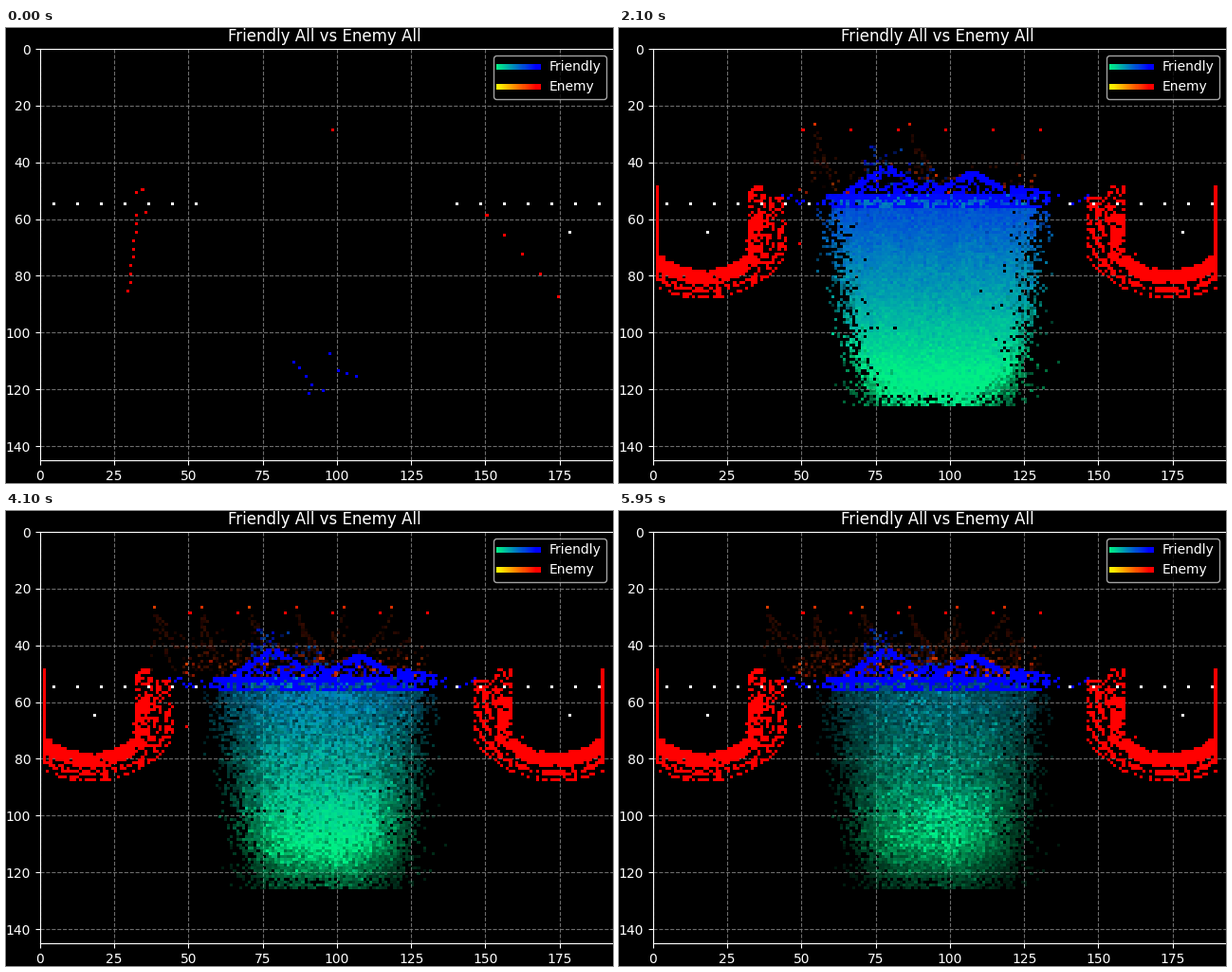
A matplotlib script that plays this animation: 640 by 480 pixels, repeating every 6000 ms.

```python
import numpy as np
import matplotlib.pyplot as plt
from matplotlib.animation import FuncAnimation
from matplotlib.legend_handler import HandlerTuple
from matplotlib.lines import Line2D

COLS, ROWS = 193, 145
FRAMES, STEP = 120, 50
LEFT, TOP, WIDE, HIGH = 36, 22, 604, 434
NEVER = 99.0

rng = np.random.default_rng(12)
R, C = np.mgrid[0:ROWS, 0:COLS]


def rand():
    return rng.random((ROWS, COLS))


def sigmoid(x):
    return 1 / (1 + np.exp(-x))


def bump(x, mid, width, power=2):
    return np.exp(-np.abs((x - mid) / width) ** power)


def winter(v):
    """Green at 0, blue at 1."""
    return np.stack([0 * v, 0.94 * (1 - v), 0.52 + 0.48 * v], axis=-1)


def autumn(v):
    """Yellow at 0, red at 1."""
    return np.stack([np.ones_like(v), 1 - v, 0 * v], axis=-1)


def start_marks():
    """Cells of the first few red and blue tracks."""
    red = [(34, 49), (32, 50), (35, 57), (98, 28)]
    red += [(round(32.4 - 0.12 * (r - 58)), r) for r in range(58, 86, 3)]
    red += [(150 + 6 * i, int(58 + 7.25 * i)) for i in range(5)]
    blue = [(90, 121), (95, 120), (97, 107)]
    blue += [(85 + 2 * i, int(110 + 2.7 * i)) for i in range(4)]
    blue += [(100 + 3 * i, 113 + i) for i in range(3)]
    return red, blue


def arc_times():
    """Arrival times of the bowl on the left: walls, thick floor, loose rings."""
    rho = np.hypot(C - 16.5, R - 54)
    wall, beyond = C == 1, C >= 32
    floor = (R > 60) & (rho >= 23.3)
    p = np.where(rho % 3 < 1.4, 0.68, 0.18)
    p = np.where((rho < 28.6) & ~beyond, 0.97, p)
    p = np.where(beyond & (C < 37) & (R < 76), 0.85, p)
    p = np.where(beyond & (R < 58), 0.42, p)
    p = np.where(wall & (R < 80), 1, p)
    inside = (C >= 1) & (C <= 44) & (R >= 48) & (rho < 33.8)
    ok = inside & (wall | beyond | floor) & (rand() < p)
    ok &= (C < 38) | (R > 51)
    return np.where(ok, 0.05 + 0.58 * rand() ** 2, NEVER)


def red_times(marks):
    right = np.full((ROWS, COLS), NEVER)
    right[:, :191] = arc_times()[:, 190::-1]
    t = np.minimum(arc_times(), right)
    t[28, 50:131:16] = np.linspace(0.1, 0.5, 6)
    t[68, 49] = 1.9
    for c, r in marks:
        t[r, c] = 0
    return t


def body_times(marks, streak):
    """Arrival times of the central cloud, which fills from the bottom up."""
    mid = 94 + 0.04 * (R - 55)
    off = np.abs(C - mid)
    edge = 36 - 0.14 * (R - 55)
    p = sigmoid((edge - off) / 2.2) * np.where(R > 121, 0.7, 1)
    ok = (rand() < p) & (R >= 51) & (R <= 125) & (off < 40)
    half = 0.3 + 0.62 * sigmoid((73 - R) / 6)
    upper = R < 95
    half *= np.where(upper, (1 + 0.5 * ((C - 94) / 35) ** 2) * streak, 1)
    u = rand()
    t = half * (-np.log(u + 1e-9) / 0.69) ** 0.4
    t = np.clip(t, 0.05, 1.15 + 0.2 * u)
    t = np.where(ok, t, NEVER)
    for c, r in marks:
        t[r, c] = 0
    return t


def ridge_times():
    """Blue peaks above the front line and its loose ends."""
    peaks = [(78, 11, 16), (93, 5, 9), (107, 9, 15), (122, 3, 14)]
    height = np.max([h * (1 - np.abs(C - c) / w) for c, h, w in peaks], axis=0)
    above = 51 - R
    p = np.where(height - above < 2, 0.85, 0.42)
    ok = (above > 0) & (above <= height + 0.5) & (rand() < p)
    t = np.where(ok, 0.9 + 0.09 * above + 0.5 * rand(), NEVER)
    gap = np.abs(C - 94) - 33
    p = np.where(R == 51, 0.6, 0.4) * np.exp(-gap / 12)
    ends = (R >= 51) & (R <= 54) & (gap > 0) & (gap < 20) & (rand() < p)
    return np.where(ends, 1.3 + 1.2 * rand(), t)


def haze():
    """Dim enemy rays and the speckled cloud they end in."""
    t = np.full((ROWS, COLS), NEVER)
    a = np.zeros((ROWS, COLS))
    p = 0.58 * sigmoid((R - 41) / 1.8) * bump(C, 88, 39, 6)
    cloud = (rand() < p) & (R > 33) & (R < 51)
    t[cloud] = (1.1 + 4.5 * rand())[cloud]
    glow = 0.08 + 0.025 * (R - 34) * rng.exponential(0.75, R.shape)
    a[cloud] = np.clip(glow, 0.06, 0.8)[cloud]
    for x0, begin in zip(range(38, 119, 16), [2.1, 1, 2.9, 1, 2.9, 2.9]):
        for _ in range(6):
            end = x0 + (92 - x0) * 0.25 + rng.uniform(-15, 15)
            for r in range(29, 49):
                c = round(x0 + (end - x0) * ((r - 26) / 22) ** 1.5)
                if rng.random() < 0.5:
                    t[r, c] = min(t[r, c], begin + 2.6 * rng.random() ** 1.5)
                    a[r, c] = max(a[r, c], rng.uniform(0.06, 0.2))
        t[26, x0], a[26, x0] = begin + 0.1, 0.85
    return t, a


streak = rng.uniform(0.62, 1.1, COLS)
red_marks, blue_marks = start_marks()
red_t = red_times(red_marks)
body_t = body_times(blue_marks, streak)
ridge_t = ridge_times()
haze_t, haze_a = haze()
haze_rgb = autumn(0.68 + 0.2 * rand())

# Dim teal dots over the peaks
spot = bump(C, 76, 5) * bump(R, 41, 6) + 0.7 * bump(C, 91, 5) * bump(R, 44, 4)
teal_t = np.where((rand() < 0.4 * spot) & (R < 51), 1.3 + 1.4 * rand(), NEVER)
teal_a = 0.25 + 0.55 * rand()
teal_rgb = winter(0.55 + 0.45 * rand())

# Cloud density, which drives opacity
half_w = 33 - 0.19 * (R - 57)
dens = (0.74 + 0.24 * bump(R, 103, 15)) * (0.25 + 0.75 * sigmoid((117 - R) / 3))
dens = 0.12 + 0.85 * dens * bump(C, 95, half_w, 3)
dens += 0.12 * bump(C, 101, 8) * bump(R, 104, 12)
dens *= np.exp(rng.normal(0, 0.24, R.shape))
tint = rng.normal(0, 1, R.shape)

# Front line: blue rows with teal cells between them
band = (R >= 51) & (R <= 55)
inner = (R == 53) | (R == 54)
mixed = band & (rand() < np.where(inner, 0.65, 0.15) * bump(C, 95, 33, 4))
mix_v = 0.4 + 0.35 * rand()


def paint(img, mask, rgb, alpha=1.0):
    img[mask, :3] = np.broadcast_to(rgb, (ROWS, COLS, 3))[mask]
    img[mask, 3] = np.broadcast_to(alpha, (ROWS, COLS))[mask]


def body_at(t):
    """Colour value and opacity; blue drains upward while the cloud thins."""
    base = 106 + 18 * np.exp(-t / 3.2)
    span = 2 + 155 * (1 - np.exp(-t / 2.6))
    v = np.clip((base - R) / span, 0, 0.95 if t else 1)
    if t:
        v = v + tint * (0.03 + 0.08 * np.exp(-t))
        v = v + (R < 80) * (streak - 0.95) * 0.7 * np.exp(-t)
    gain = 4.7 / max(t, 0.05) + 300 * np.exp(-2.9 * t)
    alpha = np.clip(dens * gain, 0, 1)
    k = np.clip((t - 1.1) / 1.2, 0, 1)
    v = np.where(band, v + (np.where(mixed, mix_v, 1) - v) * k, v)
    solid = np.where(mixed, np.maximum(alpha, 0.65), 1)
    return np.clip(v, 0, 1), np.where(band, solid, alpha)


def grid_at(t):
    img = np.zeros((ROWS, COLS, 4))
    paint(img, haze_t <= t, haze_rgb, haze_a)
    paint(img, teal_t <= t, teal_rgb, teal_a)
    v, alpha = body_at(t)
    paint(img, body_t <= t, winter(v), alpha)
    paint(img, ridge_t <= t, (0, 0, 1))
    paint(img, red_t <= t, (1, 0, 0))
    img[54, 4:53:8] = 1
    img[54, 140:189:8] = 1
    img[64, 178] = 1
    if t > 0:
        img[64, 18] = 1
    return img


plt.style.use("dark_background")
plt.rcParams["font.family"] = "DejaVu Sans"
fig = plt.figure(figsize=(6.4, 4.8), dpi=100)
ax = fig.add_axes([LEFT / 640, 1 - (TOP + HIGH) / 480, WIDE / 640, HIGH / 480])
image = ax.imshow(grid_at(0), extent=(0, COLS, ROWS, 0), aspect="auto",
                  interpolation="nearest", zorder=2)
ax.set_xticks(range(0, 176, 25))
ax.set_yticks(range(0, 141, 20))
ax.grid(color="gray", linestyle="--", linewidth=0.8, alpha=0.85)
ax.set_axisbelow(True)
ax.set_title("Friendly All vs Enemy All", x=(335.5 - LEFT) / WIDE)


def ramp(cmap, n=40):
    return tuple(Line2D([], [], ls="", marker="s", ms=4, mew=0,
                        color=cmap(np.float64(x)))
                 for x in np.linspace(0, 1, n))


legend = ax.legend([ramp(winter), ramp(autumn)], ["Friendly", "Enemy"],
                   loc="upper right", handlelength=3, numpoints=1,
                   handler_map={tuple: HandlerTuple(ndivide=None, pad=0)})
legend.set_zorder(5)


def update(i):
    image.set_data(grid_at(i * STEP / 1000))
    return [image]


anim = FuncAnimation(fig, update, frames=FRAMES, interval=STEP,
                     init_func=lambda: update(0), repeat=True,
                     repeat_delay=0, blit=False)
plt.show()
```
